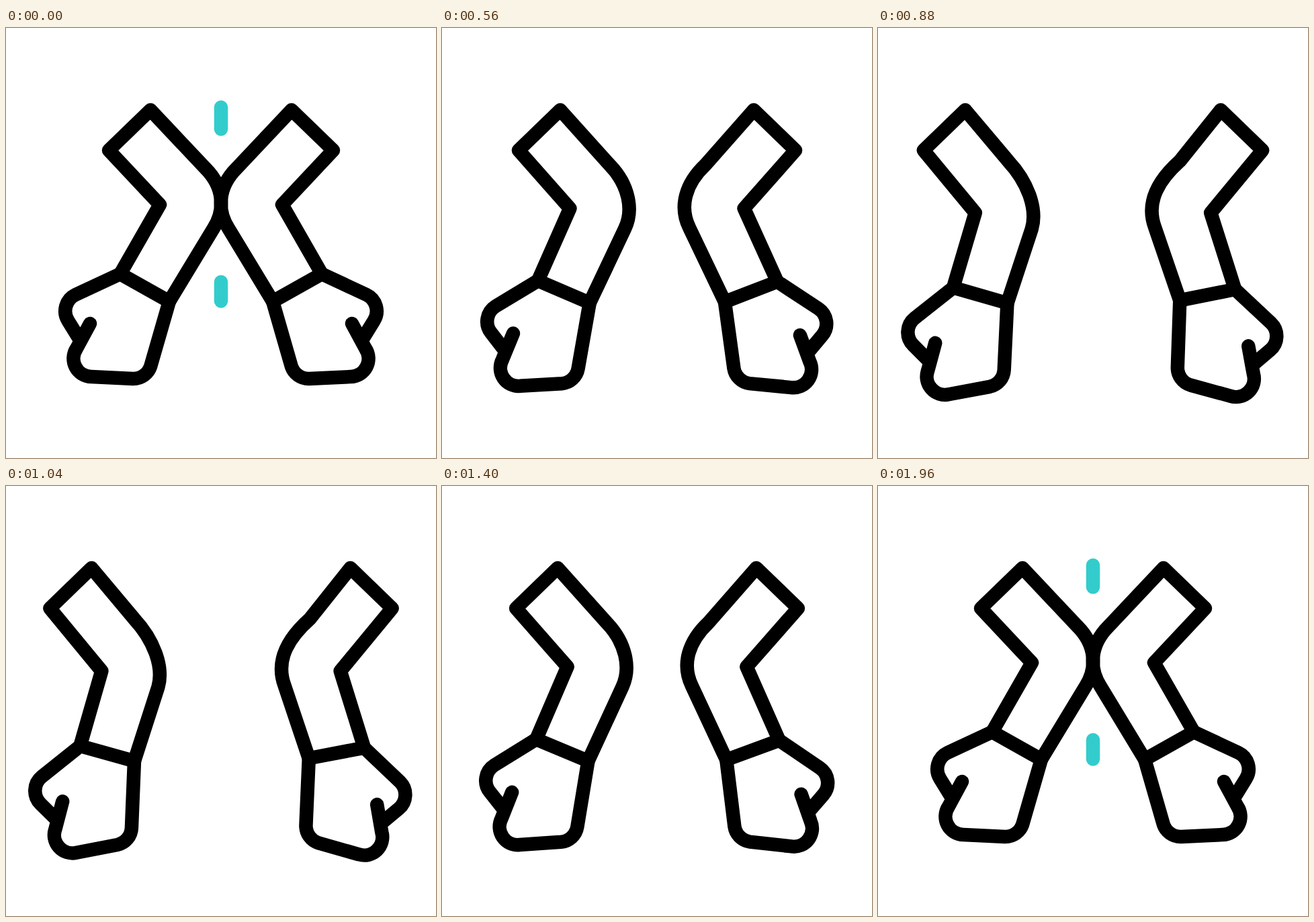
An HTML page that plays this animation: 640x640 px, repeating every 2 s.

```html
<!DOCTYPE html>
<html lang="en">
<head>
<meta charset="utf-8">
<title>Crossed arms</title>
<style>
  html, body { margin: 0; width: 100%; height: 100%; overflow: hidden; background: #fff; }
  svg { display: block; width: 100vw; height: 100vh; }
  path { fill: none; stroke: #000; stroke-width: 20.5; stroke-linecap: round; stroke-linejoin: round; }
  .spark { stroke: #33cccc; }
</style>
</head>
<body>
<svg viewBox="0 0 640 640">
  <path class="spark" id="top"/>
  <path class="spark" id="bottom"/>
  <g id="left"><path class="arm"/><path class="hand"/></g>
  <g transform="translate(640 0) scale(-1 1)"><g id="right"><path class="arm"/><path class="hand"/></g></g>
</svg>
<script>
const LOOP = 2000, STEP = 40, SHIFT = 85, REACH = 88 / 85;

const HAND = 'M170 366 L103.5 397 A27 27 0 0 0 92.4 435.7 L108 461 ' +
  'M125 440 L105 477 A27 27 0 0 0 127 519 L189 522 A27 27 0 0 0 215.5 502.5 L243 407';

// Elbow points: inner corner, then the outer curve
const BENT = [[229, 263], [297, 209], [325, 237], [326, 272], [309, 298]];
const SIDES = {
  left: {
    pivot: [271, 260], turn: 13.3,
    open: [[230, 275], [279, 198], [307, 228], [323, 268], [314, 299]]
  },
  right: {
    pivot: [254.5, 302.5], turn: 18,
    open: [[230, 275], [276, 198], [305, 224], [328, 257], [313, 297]]
  }
};

// Cubic ease with handles at half the span
function ease(x) {
  if (x <= 0) return 0;
  if (x >= 1) return 1;
  let lo = 0, hi = 1, u = 0.5;
  for (let i = 0; i < 24; i++) {
    u = (lo + hi) / 2;
    if (1.5 * u * (1 - u) + u ** 3 < x) lo = u; else hi = u;
  }
  return u * u * (3 - 2 * u);
}

const span = (t, from, to) => ease((t - from) / (to - from));
const mix = (a, b, k) => a.map((v, i) => v + (b[i] - v) * k);

function spin([x, y], [px, py], deg) {
  const a = deg * Math.PI / 180, c = Math.cos(a), s = Math.sin(a);
  const dx = x - px, dy = y - py;
  return [px + dx * c + dy * s, py - dx * s + dy * c];
}

function drawArm(id, k) {
  const { pivot, turn, open } = SIDES[id];
  const g = document.getElementById(id);
  const angle = turn * k;
  const [inner, a, b, c, d] = BENT.map((p, i) => mix(p, open[i], k));
  const thumbSide = spin([170, 366], pivot, angle);
  const outerSide = spin([243, 407], pivot, angle);
  g.setAttribute('transform', `translate(${-SHIFT * k} 0)`);
  g.querySelector('.arm').setAttribute('d',
    `M${thumbSide} L${inner} L153 182 L215 122 L${a} C${b} ${c} ${d} L${outerSide} Z`);
  g.querySelector('.hand').setAttribute('transform', `rotate(${-angle} ${pivot})`);
}

function drawSpark(id, from, to, k) {
  const el = document.getElementById(id);
  el.style.visibility = k > 0.003 ? 'visible' : 'hidden';
  el.setAttribute('d', `M320 ${from} V${from + (to - from) * k}`);
}

function draw(ms) {
  const t = Math.floor((ms % LOOP) / STEP) * STEP;
  const k = REACH * (span(t, 167, 1000) - span(t, 1000, 1790));
  const glow = 1 - span(t, 100, 500) + span(t, 1496, 1960);
  drawArm('left', k);
  drawArm('right', k);
  drawSpark('top', 150.5, 118, glow);
  drawSpark('bottom', 378, 406.5, glow);
}

document.querySelectorAll('.hand').forEach(el => el.setAttribute('d', HAND));

const start = performance.now();
function tick() {
  draw(performance.now() - start);
  requestAnimationFrame(tick);
}
tick();
</script>
</body>
</html>
```
